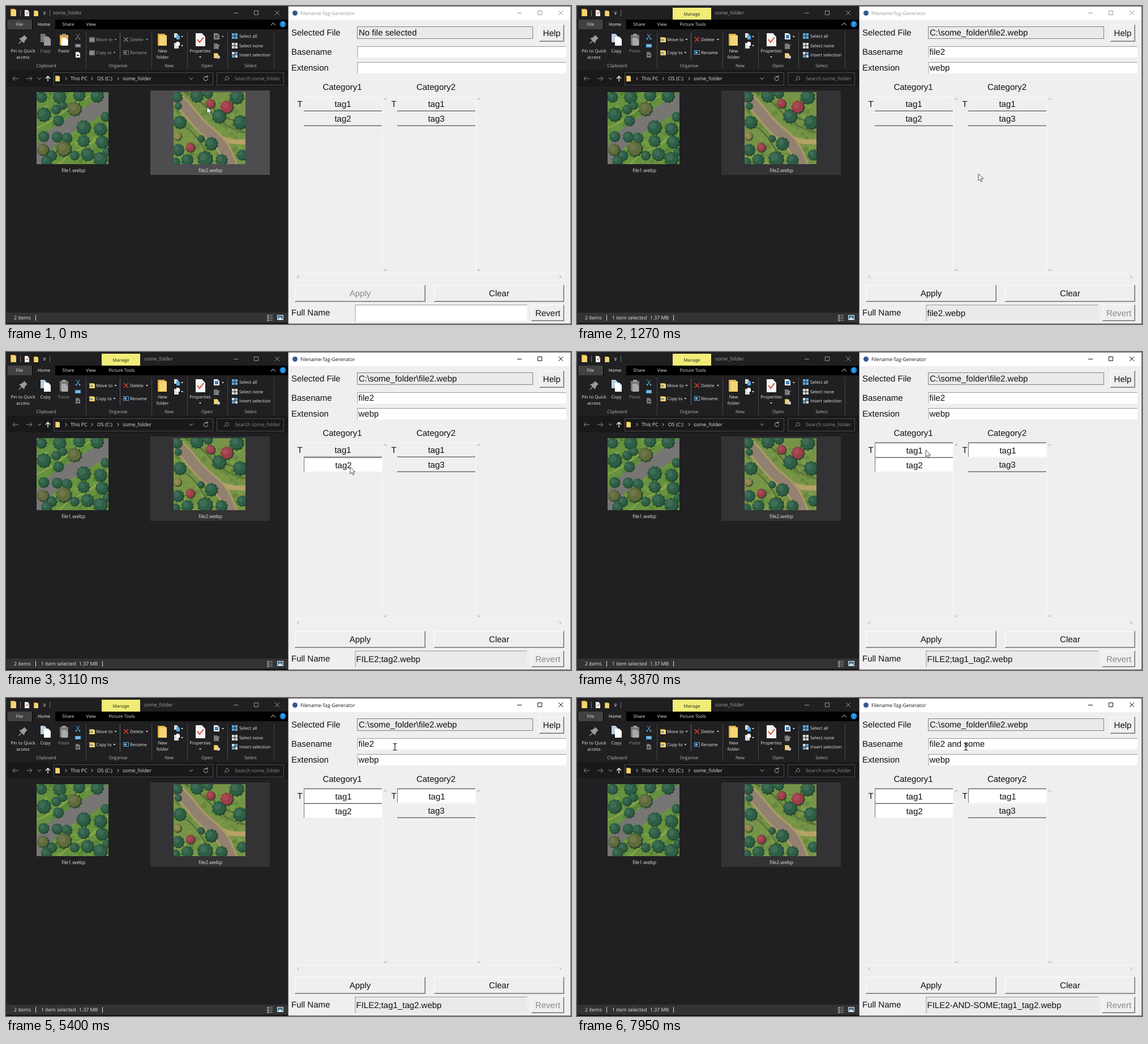
An HTML page with a canvas for the animation above (8000 ms loop, 998 by 561 pixels).

```html
<!DOCTYPE html>
<html lang="en">
<head>
<meta charset="utf-8">
<title>Filename-Tag-Generator</title>
<style>
html, body { margin: 0; width: 100%; height: 100%; overflow: hidden; background: #000; }
canvas { display: block; }
</style>
</head>
<body>
<canvas id="stage" width="998" height="561"></canvas>
<script>
const LOOP = 8000;
const stage = document.getElementById('stage').getContext('2d');
stage.textRendering = 'geometricPrecision';
let g = stage;

const FACE = '#f0eef0', PANEL = '#201f21', PALE = '#e8e8e8', DIM = '#8b8b8b';
const YELLOW = '#f5d573', BLUE = '#5aa9e0', SHADE = '#747374';

// Moments of the session, in ms
const SELECT = 30, DRAG = 520, DROP = 1110, TAG2 = 2750, TAG1 = 3870, FOCUS = 5600;
const TYPED = ' and some', KEYS = [6850, 6950, 7070, 7180, 7290, 7420, 7560, 7720, 7860];

// Mouse: time, x, y
const MOUSE = [
  [0, 355, 178], [490, 355, 178], [610, 361, 229], [670, 376, 255], [730, 425, 270],
  [830, 560, 292], [970, 695, 301], [1080, 709, 296], [1610, 709, 296], [1850, 690, 268],
  [2150, 632, 218], [2390, 609, 202], [2450, 608, 203], [3200, 608, 203], [3530, 617, 177],
  [3710, 616, 173], [4260, 616, 173], [4420, 632, 260], [4650, 665, 420], [4720, 668, 428],
  [4860, 676, 300], [5040, 684, 115], [5300, 687, 86], [LOOP, 687, 86]
];

// ---------- helpers ----------
function box(x, y, w, h, color) {
  g.fillStyle = color;
  g.fillRect(x, y, w, h);
}
function frame(x, y, w, h, color) {
  g.strokeStyle = color;
  g.lineWidth = 1;
  g.strokeRect(x + .5, y + .5, w - 1, h - 1);
}
function line(d, color, width = 1) {
  g.strokeStyle = color;
  g.lineWidth = width;
  g.stroke(new Path2D(d));
}
function shape(d, color) {
  g.fillStyle = color;
  g.fill(new Path2D(d));
}
function disc(x, y, r, color) {
  g.fillStyle = color;
  g.beginPath();
  g.arc(x, y, r, 0, 7);
  g.fill();
}
function write(s, x, y, color, size, align, family) {
  g.font = `${size}px ${family}`;
  g.textAlign = align;
  g.fillStyle = color;
  g.fillText(s, x, y + size * .35);
}
const ui = (s, x, y, color = PALE, size = 8.75, align = 'left') =>
  write(s, x, y, color, size, align, '"Open Sans", sans-serif');
const small = (s, x, y, color, align) => ui(s, x, y, color, 7.8, align);
const mid = (s, x, y, color) => small(s, x, y, color, 'center');
const arial = (s, x, y, color = '#111', align = 'left') =>
  write(s, x, y, color, 15, align, '"Liberation Sans", Arial, sans-serif');

const caret = (x, y, color) => shape(`M${x - 2} ${y - 1}h4l-2 2.4z`, color);
function chevron(x, y, dir, color, s = 3) {
  const h = s * .55;
  line({
    up: `M${x - s} ${y + h}l${s} ${-2 * h}l${s} ${2 * h}`,
    down: `M${x - s} ${y - h}l${s} ${2 * h}l${s} ${-2 * h}`,
    left: `M${x + h} ${y - s}l${-2 * h} ${s}l${2 * h} ${s}`,
    right: `M${x - h} ${y - s}l${2 * h} ${s}l${-2 * h} ${s}`
  }[dir], color);
}
function folder(x, y, w, h) {
  box(x, y, w * .8, h, '#d9ae45');
  box(x + w * .15, y + h * .12, w * .85, h * .88, YELLOW);
}
function page(x, y, w, h, color) {
  shape(`M${x} ${y}h${w * .65}l${w * .35} ${h * .28}v${h * .72}h${-w}z`, color);
}
function windowButtons(x, y, color) {
  line(`M${x} ${y + .5}h8M${x + 36.5} ${y - 3.5}h7v7h-7z` +
    `M${x + 73} ${y - 4}l8 8m0-8l-8 8`, color);
}

// ---------- thumbnails ----------
function tree(x, y, r, color) {
  for (const [k, dx, tint] of [[1.05, 1, '#22402e'], [.95, 0, color], [.5, -r * .2, '#ffffff16']]) {
    g.beginPath();
    for (let a = 0; a < 6.28; a += .12) {
      const q = r * k * (1 + .07 * Math.sin(a * 10 + x));
      g.lineTo(x + dx + q * Math.cos(a), y + dx + q * Math.sin(a));
    }
    g.fillStyle = tint;
    g.fill();
  }
}
function thumbnail(ground, trail, trees) {
  const c = document.createElement('canvas');
  c.width = c.height = 128;
  g = c.getContext('2d');
  box(0, 0, 128, 128, ground);
  let seed = 7;
  const rnd = () => (seed = seed * 16807 % 2147483647) / 2147483647;
  for (let i = 0; i < 160; i++)
    disc(rnd() * 128, rnd() * 128, 1 + rnd() * 4, i % 2 ? '#8eb84d44' : '#48732f55');
  trail();
  for (const [color, list] of trees)
    for (const [x, y, r] of list) tree(x, y, r, color);
  g = stage;
  return c;
}
const thumb1 = thumbnail('#67923f', () => {
  line('M-5 66C40 50 50 20 130 -8M40 130C70 90 100 110 135 45', '#94ad50', 2);
  line('M-2 128C22 65 65 62 132 12', '#777674', 27);
}, [
  ['#2d5f46', [[8, 8, 9], [40, 8, 11], [75, 5, 10], [107, 6, 11], [34, 30, 8], [46, 23, 7],
    [12, 39, 12], [38, 50, 9], [12, 78, 9], [36, 79, 9], [53, 81, 9], [83, 62, 12],
    [113, 65, 11], [83, 86, 10], [116, 88, 11], [90, 110, 11], [113, 118, 12], [67, 112, 8],
    [26, 112, 9], [17, 122, 9], [122, 43, 8], [124, 105, 7]]],
  ['#616b3a', [[67, 29, 12], [11, 102, 10], [48, 100, 13]]]
]);
const thumb2 = thumbnail('#769347', () => {
  line('M20 0C60 12 70 60 128 72M0 55C30 55 50 90 70 128M60 0C70 40 90 50 128 52', '#4d6a33', 2);
  line('M70 72C86 86 104 90 134 88', '#b5a268', 9);
  for (const [w, color] of [[24, '#aa9a68'], [17, '#928070']])
    line('M-5 2C28 28 32 44 56 66C80 84 93 98 104 134', color, w);
}, [
  ['#2d5f46', [[6, 8, 9], [8, 24, 6], [11, 53, 11], [41, 6, 11], [61, 2, 8], [112, 8, 12],
    [118, 53, 12], [81, 42, 12], [8, 102, 10], [67, 91, 11], [49, 82, 6], [56, 118, 13],
    [24, 120, 10], [122, 111, 9], [85, 120, 10], [3, 124, 8]]],
  ['#9f3c48', [[66, 20, 8], [95, 26, 11], [30, 98, 8]]],
  ['#8f8548', [[7, 78, 7]]]
]);

// ---------- file manager ----------
function titleBar(picked) {
  box(0, 0, 498, 24, PANEL);
  box(0, 24, 498, 17, '#000');
  folder(8, 5, 10, 13);
  box(25, 7, 1, 11, '#777');
  page(33, 7, 8, 11, '#eee');
  line('M35 12l2 2 3-4', '#c33');
  folder(49, 8, 8, 10);
  line('M65.500 11h5', '#ccc');
  caret(68, 14, '#ccc');
  box(77, 7, 1, 11, '#777');
  windowButtons(402, 12, '#9a9a9a');
  box(2, 24, 44, 17, '#414042');
  box(47, 24, 40, 17, PANEL);
  mid('File', 24, 32);
  mid('Home', 67, 32, '#fff');
  mid('Share', 110, 32);
  mid('View', 150, 32);
  if (picked) {
    box(169, 3, 68, 21, '#f1ec78');
    mid('Manage', 203, 14, '#222');
    mid('Picture Tools', 204.5, 32);
  }
  ui('some_folder', picked ? 244 : 83, 12, '#a5a5a5');
  chevron(472, 32, 'up', '#ddd', 4);
  disc(489, 32, 5.5, '#1684d8');
  mid('?', 489, 32, '#fff');
}
function ribbon(picked) {
  const on = picked ? PALE : '#a2a2a2', off = picked ? '#8d8d8d' : PALE;
  const ink = picked ? BLUE : '#777';
  box(0, 41, 498, 72, PANEL);
  for (const x of [141, 257, 320, 391, 473]) box(x, 45, 1, 66, '#464547');
  box(201, 47, 1, 47, '#666');

  shape('M32 51l6 6-2 1-3 4-1 4-4-4-5 5-1-1 5-5-4-4 4-1 4-3z', '#9b9b9b');
  page(61, 49, 11, 15, picked ? '#b9cfe2' : '#777');
  page(67, 54, 12, 16, picked ? '#fff' : '#999');
  box(95, 51, 15, 18, picked ? '#777' : '#e3b14d');
  box(99, 49, 7, 4, '#999');
  page(98, 56, 11, 14, picked ? '#aaa' : '#fff');
  line('M124 49l5 8m1-8l-5 8', ink);
  disc(124, 58, 1.4, ink);
  disc(130, 58, 1.4, ink);
  box(122, 67, 10, 6, ink);
  line('M124 70h6', '#ddd');
  page(123, 81, 8, 10, picked ? '#777' : '#eee');
  line('M125 87h4', '#333', 2);
  mid('Pin to Quick', 30, 79);
  mid('access', 30, 90);
  mid('Copy', 69.5, 79, on);
  mid('Paste', 102, 79, off);

  for (const y of [59, 82]) {
    if (picked) folder(147, y - 4, 10, 9);
    else box(147, y - 4, 10, 9, '#777');
    line(`M147 ${y + 1}h6m-2-2l2 2-2 2`, picked ? '#1c75bd' : '#bbb');
  }
  small('Move to', 159, 59, on);
  caret(193.500, 59, on);
  small('Copy to', 159, 82, on);
  caret(191.500, 82, on);
  line('M208 55l8 8m0-8l-8 8', picked ? '#d33b30' : '#777', 1.7);
  small('Delete', 219, 59, on);
  caret(249, 59, on);
  frame(207, 78, 10, 8, ink);
  box(209, 80, 4, 4, ink);
  small('Rename', 219, 82, on);

  folder(268, 49, 16, 21);
  mid('New', 276.5, 79);
  mid('folder', 276.5, 90);
  page(297, 48, 7, 8, '#ddd');
  page(301, 51, 6, 8, BLUE);
  caret(311, 54, PALE);
  page(297, 65, 8, 10, '#ddd');
  page(301, 63, 6, 7, '#fff');
  caret(311, 70, PALE);

  page(335, 48, 17, 23, '#f3f3f3');
  line('M338 59l4 5 7-9', '#d94b2c', 2);
  mid('Properties', 343, 79);
  caret(343, 90, PALE);
  page(367, 48, 10, 11, picked ? '#eee' : '#888');
  box(369, 51, 6, 6, picked ? '#3c83c4' : '#555');
  caret(383, 54, on);
  page(367, 66, 9, 10, '#777');
  line('M371 74l7-6', '#aaa');
  folder(367, 83, 8, 9);
  disc(375, 90, 3, '#c9c9c9');

  [53, 70, 86].forEach((y, row) => {
    for (let i = 0; i < 4; i++)
      box(399 + i % 2 * 5.5, y - 5 + (i >> 1) * 5.5, 4.5, 4.5,
        row == 1 || (row == 2 && i % 3 == 0) ? '#ddd' : BLUE);
  });
  small('Select all', 412, 53);
  small('Select none', 412, 70);
  small('Insert selection', 412, 86);
  [['Clipboard', 71], ['Organise', 198], ['New', 288], ['Open', 355], ['Select', 432]]
    .forEach(([s, x]) => mid(s, x, 105, '#bbb'));
}
function addressBar() {
  box(0, 113, 498, 29, '#19181a');
  line('M22 128h-10m4-4l-4 4 4 4M36 128h10m-4-4l4 4-4 4', '#8f8f8f');
  chevron(59, 128, 'down', '#aaa');
  line('M74 133v-9m-4 4l4-4 4 4', '#fff', 1.3);
  frame(84, 117, 282, 23, '#4b4a4c');
  frame(372, 117, 119, 23, '#4b4a4c');
  folder(87, 123, 8, 10);
  for (const x of [106, 152, 198]) chevron(x, 128, 'right', '#ccc', 2.5);
  ui('This PC', 114, 128);
  ui('OS (C:)', 161, 128);
  ui('some_folder', 206, 128);
  chevron(327, 128, 'down', '#bbb');
  line('M355 125a3.700 3.700 0 1 0 1.500 3M356 122v3.500h-3.500', '#bbb');
  line('M385 132l3-3a3 3 0 1 1 1 1', '#999');
  ui('Search some_folder', 404, 128, DIM);
}
function fileManager(t) {
  const picked = t >= SELECT;
  titleBar(picked);
  ribbon(picked);
  addressBar();
  box(0, 142, 498, 399, PANEL);
  box(255, 149, 211, 149, picked ? '#333235' : '#4d4c4f');
  g.drawImage(thumb1, 54, 152, 127, 127);
  g.drawImage(thumb2, 295.5, 152, 127, 127);
  ui('file1.webp', 119, 290, PALE, 8.75, 'center');
  ui('file2.webp', 361, 290, PALE, 8.75, 'center');
  box(0, 541, 498, 18, '#333234');
  box(0, 559, 498, 2, '#111');
  ui('2 items', 14, 550);
  box(52, 545, 1, 10, '#ddd');
  if (picked) {
    ui('1 item selected', 62, 550);
    ui('1.37 MB', 129, 550);
    box(170, 545, 1, 10, '#ddd');
  }
  for (let y = 545; y < 555; y += 3) {
    box(461, y, 4, 2, '#999');
    box(466, y, 5, 1, '#999');
  }
  box(479, 545, 11, 9, '#cfe6f5');
  box(480, 546, 9, 7, '#49768f');
  shape('M480 553l4-4 5 4z', '#dfeaf0');
  box(0, 0, 1, 561, '#2c2b2e');
}

// ---------- tag generator ----------
function button(label, x, y, w, h, enabled = true) {
  box(x, y, w, h, '#777');
  box(x, y, w - 1, h - 1, '#fff');
  box(x + 1, y + 1, w - 2, h - 2, '#a9a8a9');
  box(x + 1, y + 1, w - 3, h - 3, FACE);
  arial(label, x + w / 2, y + h / 2, enabled ? '#111' : DIM, 'center');
}
function tag(label, x, y, down) {
  if (down) {
    box(x, y, 138, 25, '#fff');
    box(x, y - 1, 138, 1, '#a3a2a3');
    box(x, y, 138, 1, SHADE);
    box(x, y, 1, 25, SHADE);
  } else {
    box(x, y, 138, 1, '#fafafa');
    box(x, y + 24, 138, 1, '#a8a7a8');
    box(x, y + 25, 138, 1, SHADE);
  }
  arial(label, x + 69 + down, y + 13 + down, '#111', 'center');
}
function entry(s, x, y, w, h, color = '#fff') {
  box(x, y, w, h, color);
  box(x, y, w, 1, '#9a999a');
  box(x, y, 1, h, '#9a999a');
  arial(s, x + 2, y + h / 2);
}
function generator(t) {
  const loaded = t >= DROP, two = t >= TAG2, one = t >= TAG1;
  const typed = TYPED.slice(0, KEYS.filter(k => t >= k).length);
  const base = loaded ? 'file2' + typed : '';
  const tags = [one && 'tag1', two && 'tag2'].filter(Boolean).join('_');
  const full = !loaded ? '' : !two ? 'file2.webp' :
    base.trim().replace(/ /g, '-').toUpperCase() + ';' + tags + '.webp';

  box(498, 0, 500, 561, FACE);
  box(498, 0, 500, 25, '#fff');
  frame(498, 0, 500, 561, '#6a696a');
  disc(510.5, 12.5, 4.5, '#36598c');
  const title = two ? '#111' : '#999';
  ui('Filename-Tag-Generator', 520, 13, title, 8.65);
  windowButtons(903, 12, title);

  arial('Selected File', 504, 47);
  box(621, 37, 309, 21, '#ebe9eb');
  frame(620, 36, 311, 22, '#828182');
  arial(loaded ? 'C:\\some_folder\\file2.webp' : 'No file selected', 623, 47);
  button('Help', 942, 33, 44, 30);
  arial('Basename', 504, 81);
  entry(base, 620.5, 71, 369, 20);
  arial('Extension', 504, 109);
  entry(loaded ? 'webp' : '', 620.5, 99, 369, 20);
  if (t >= FOCUS && t < 7920 && (t - FOCUS) % 895 < 600)
    box(622.5 + g.measureText(base).width - (typed ? 0 : .5), 73, 1.5, 16, '#111');

  arial('Category1', 594, 143, '#111', 'center');
  arial('Category2', 759.5, 143, '#111', 'center');
  for (const x of [664, 829]) {
    box(x, 160, 1, 311, '#fafafa');
    chevron(x + 6, 164, 'up', '#999', 2.5);
    chevron(x + 6, 466, 'down', '#999', 2.5);
  }
  box(511, 471, 475, 1, '#fafafa');
  chevron(516, 477.500, 'left', '#999', 2.5);
  chevron(979, 477.500, 'right', '#999', 2.5);
  arial('T', 519, 173, '#111', 'center');
  arial('T', 685, 173, '#111', 'center');
  tag('tag1', 526, 160, +one);
  tag('tag2', 526, 186, +two);
  tag('tag1', 691, 160, +one);
  tag('tag3', 691, 186, 0);

  button('Apply', 510, 492, 231, 30, loaded);
  button('Clear', 756, 492, 230, 30);
  arial('Full Name', 504, 541);
  entry(full, 616.5, 527, 304, 29, loaded ? '#ebe9eb' : '#fff');
  button('Revert', 928, 527, 58, 29, !loaded);
}

// ---------- pointer ----------
function mouseAt(t) {
  let i = MOUSE.findIndex(k => k[0] > t) - 1;
  if (i < 0) i = 0;
  const [a, b] = [MOUSE[i], MOUSE[i + 1]], d = b[0] - a[0], u = (t - a[0]) / d;
  const same = (p, q) => !p || !q || (p[1] == q[1] && p[2] == q[2]);
  // Speed at key j, zero beside a rest
  const speed = (j, c) => {
    const p = MOUSE[j - 1], k = MOUSE[j], q = MOUSE[j + 1];
    return same(p, k) || same(k, q) ? 0 : (q[c] - p[c]) / (q[0] - p[0]) * d;
  };
  return [1, 2].map(c => {
    const m = speed(i, c), n = speed(i + 1, c), v = b[c] - a[c];
    return a[c] + u * m + u * u * (3 * v - 2 * m - n) + u * u * u * (m + n - 2 * v);
  });
}
function pointer(t) {
  const [x, y] = mouseAt(t);
  if (t >= DRAG && t < DROP) {
    const [gx, gy] = mouseAt(t - 60);
    g.globalAlpha = .42;
    g.drawImage(thumb2, gx - 27, gy - 48, 54, 54);
    box(gx - 27, gy - 48, 54, 54, '#dde3d8');
    g.globalAlpha = 1;
  }
  const inEntry = x > 621 && ((y > 71 && y < 91) || (y > 99 && y < 119));
  g.save();
  g.translate(x, y);
  if (inEntry) line('M-3.500-5.500h2.500l1 1 1-1h2.500M0-4.500v9.500M-3.500 6h2.500l1-1 1 1h2.500', '#111', 1.2);
  else {
    const arrow = 'M0 0v12l2.800-2.600 2 4.600 2.100-.9-2-4.500h3.800z';
    shape(arrow, '#fff');
    line(arrow, '#222', .8);
  }
  g.restore();
}

function draw() {
  const t = performance.now() % LOOP;
  fileManager(t);
  generator(t);
  pointer(t);
  requestAnimationFrame(draw);
}
draw();
</script>
</body>
</html>
```
